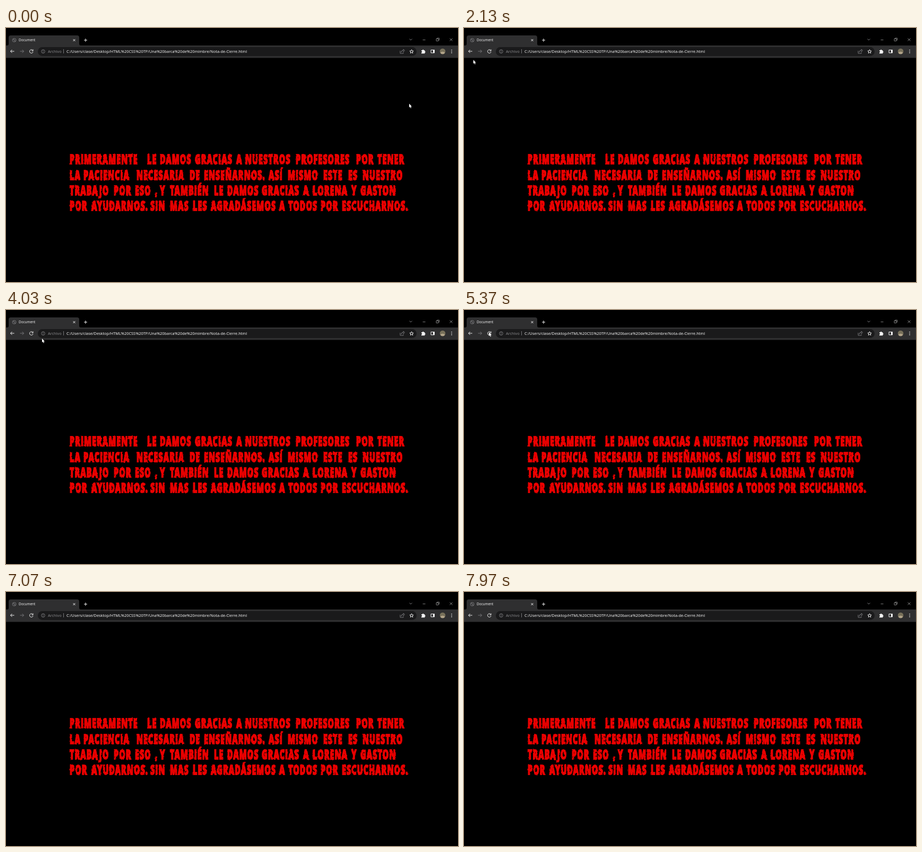
Recreate the animation shown at these times as an HTML page. Size 852 by 480 pixels, loop 8000 ms.

```html
<!DOCTYPE html>
<html lang="es">
<head>
<meta charset="utf-8">
<title>Document</title>
<style>
  html, body { margin: 0; width: 100%; height: 100%; overflow: hidden; background: #000; }
  svg { display: block; width: 852px; height: 480px; }
  .ui { font: 500 7.4px "Open Sans", "Noto Sans", sans-serif; fill: #fff; }
  .ui .tab { font-size: 6.4px; }
  .line { fill: none; stroke: #f2f2f2; stroke-width: 1; }
  .dim { stroke: #77777a; }
  .thin { stroke: #b0b0b0; stroke-width: .7; }
  .message {
    font: 800 25px "Open Sans", "Noto Sans", sans-serif;
    letter-spacing: 1.7px;
    fill: #f00000;
    stroke: #e40000;
    stroke-width: 2;
    filter: url(#ragged);
  }
  #pointer { animation: roam 8s linear infinite; }
  @keyframes roam {
    0%, .375% { transform: translate(760px, 143px); }
    6.625%, 8.375% { transform: translate(700px, 158px); }
    13.125% { transform: translate(64px, 130px); }
    14.625% { transform: translate(86px, 141px); }
    16.625%, 18.375% { transform: translate(100px, 109px); }
    19.75% { transform: translate(136px, 30px); }
    21.25%, 24.625% { transform: translate(40px, 101px); }
    28.125% { transform: translate(1px, 30px); }
    32.875%, 39.125% { transform: translate(89px, 80px); }
    42.5% { transform: translate(112px, 139px); }
    46.25% { transform: translate(52px, 47px); }
    49.125%, 50.375% { transform: translate(68px, 54px); }
    58.375%, 84.62% { transform: translate(47px, 42px); visibility: visible; }
    84.63%, 100% { transform: translate(47px, 42px); visibility: hidden; }
  }
</style>
</head>
<body>
<svg viewBox="0 0 852 480">
  <defs>
    <filter id="ragged" x="-2%" y="-10%" width="104%" height="120%" color-interpolation-filters="sRGB">
      <feTurbulence type="fractalNoise" baseFrequency=".3 .15" numOctaves="2" seed="4"/>
      <feDisplacementMap in="SourceGraphic" scale="2.6" xChannelSelector="R" yChannelSelector="G"/>
    </filter>
  </defs>
  <rect width="852" height="480"/>

  <!-- tab and toolbar -->
  <path d="M2 33q3 0 3-3V18q0-4 4-4h125q4 0 4 4v12q0 3 3 3h711v23.500H0V33z" fill="#2f2f30"/>
  <rect x="60" y="36" width="714" height="17" rx="8.500" fill="#1a1a1b"/>
  <g class="ui">
    <text class="tab" x="24" y="25.300">Document</text>
    <text x="79" y="47" fill="#8e8e90">Archivo</text>
    <text x="114" y="47">C:/Users/clase/Desktop/HTML%20CSS%20TP/Una%20barca%20de%20mimbre/Nota-de-Cierre.html</text>
  </g>

  <g class="line">
    <g class="dim">
      <circle cx="15.500" cy="23" r="3.400"/>
      <path d="M13 21l3 1-1 2 3 1M26.500 44h7M30.500 41l3 3-3 3"/>
      <circle cx="70" cy="44.300" r="3.300"/>
      <path d="M70 43.800v2.200M70 42v1M108.500 40v8"/>
      <path d="M743 43v5h6v-2M745 46q0-4 4-4v-2l2.500 2.500L749 45v-2"/>
      <path d="M760.500 20.500l2.500 2.500 2.500-2.500"/>
    </g>
    <path d="M126.500 21l4 4m0-4l-4 4M150 20v6M147 23h6"/>
    <path class="thin" d="M785.500 22.500h5M811 20.500h4v4h-4zM812.500 20v-1h4v4h-1M836.500 19.500l5 5m0-5l-5 5"/>
    <path d="M15.500 44h-7M11.500 41l-3 3 3 3"/>
    <path d="M50.500 42.300A3.300 3.300 0 1 0 51 45M51 40.500v2.700h-2.700"/>
    <path d="M764.500 40.800l1 2.400 2.600.2-2 1.700.7 2.500-2.300-1.400-2.300 1.400.7-2.500-2-1.700 2.600-.2z"/>
    <path d="M801 41.500h6.500v5.500H801z"/>
  </g>
  <g fill="#f2f2f2">
    <path d="M783 42h2a1.200 1.200 0 0 1 2.400 0h2v2a1.200 1.200 0 0 1 0 2.400v1.800H783v-2a1.200 1.200 0 0 0 0-2.400z"/>
    <path d="M805 41.500h3V47h-3z"/>
    <circle cx="840" cy="41.500" r=".8"/>
    <circle cx="840" cy="44.200" r=".8"/>
    <circle cx="840" cy="46.900" r=".8"/>
  </g>
  <circle cx="823" cy="44" r="5.300" fill="#77705a"/>
  <path d="M818.500 46.800a5.300 5.300 0 0 0 9 0q-4.500-4-9 0" fill="#b3a58a"/>

  <g class="message" id="message"></g>

  <path id="pointer" d="M0 0v7.200l1.600-1.400 1.200 2.700 1.200-.5-1.200-2.600h2.200z" fill="#fff"/>
</svg>
<script>
  const CONDENSE = 0.58;
  const lines = [
    [257, "PRIMERAMENTE LE DAMOS GRACIAS A NUESTROS PROFESORES POR TENER",
      [120, 266, 290, 356, 434, 451, 546, 660, 700]],
    [286.500, "LA PACIENCIA NECESARIA DE ENSEÑARNOS. ASÍ MISMO ESTE ES NUESTRO",
      [120, 146, 246, 346, 373, 495, 531, 598, 645, 672]],
    [315.500, "TRABAJO POR ESO , Y TAMBIÉN LE DAMOS GRACIAS A LORENA Y GASTON",
      [120, 203, 243, 281, 290, 309, 392, 417, 482, 560, 578, 651, 668]],
    [345, "POR AYUDARNOS. SIN MAS LES AGRADÁSEMOS A TODOS POR ESCUCHARNOS.",
      [120, 161, 272, 309, 352, 386, 515, 532, 593, 633]]
  ];

  const message = document.getElementById("message");
  for (const [y, text, starts] of lines) {
    text.split(" ").forEach((word, i) => {
      const node = document.createElementNS(message.namespaceURI, "text");
      node.setAttribute("transform", `translate(${starts[i]} ${y}) scale(${CONDENSE} 1)`);
      node.textContent = word;
      message.append(node);
    });
  }
</script>
</body>
</html>
```
